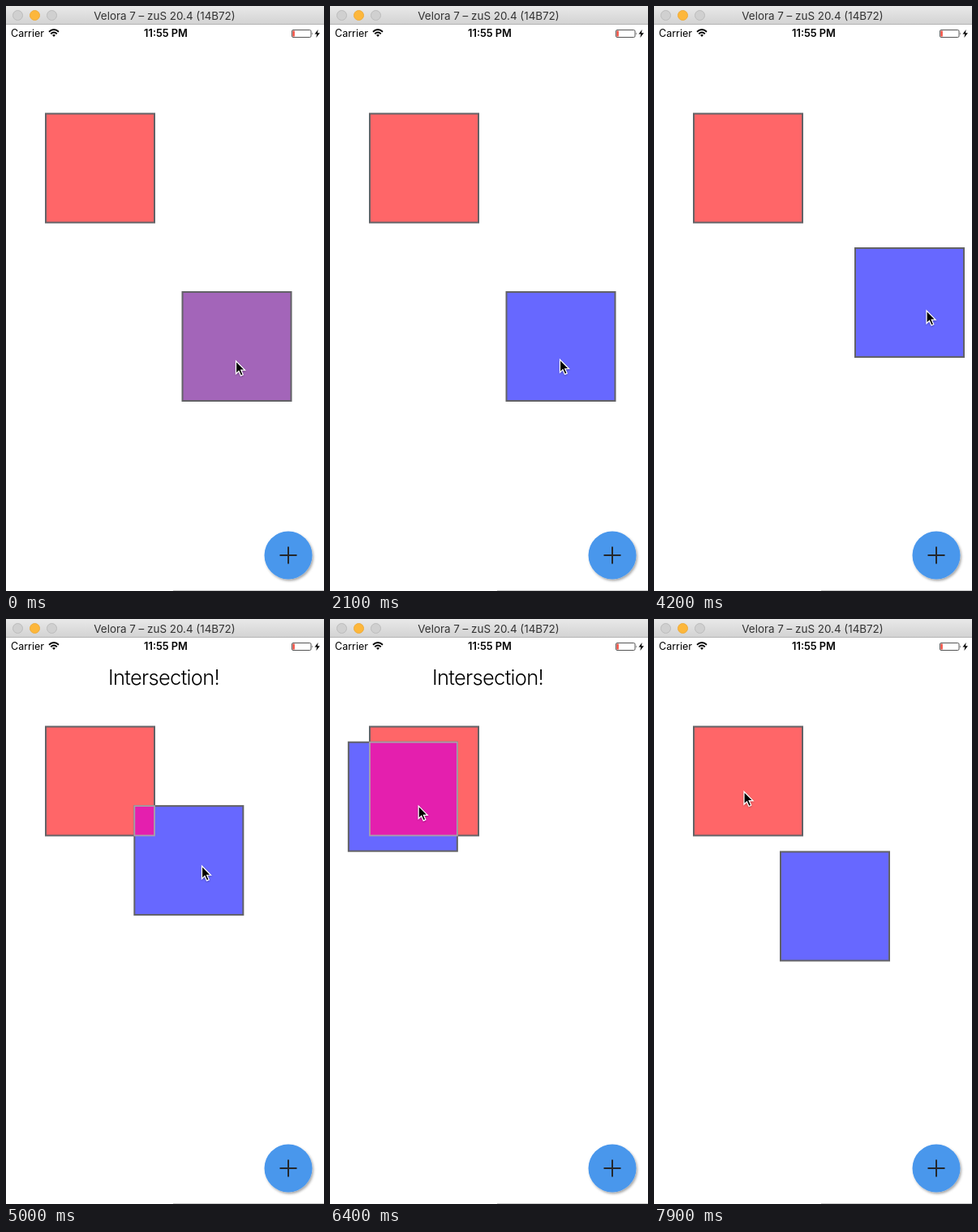
An HTML page for the animation above (8 s loop, 392 px wide and 720 px high).

```html
<!DOCTYPE html>
<html lang="en">
<head>
<meta charset="utf-8">
<style>
  html, body { margin: 0; width: 100%; height: 100%; overflow: hidden; background: #fff; }
  svg { display: block; width: 392px; height: 720px; font-family: Inter, Roboto, sans-serif; }
  .square { stroke: #626266; stroke-width: 2; }
</style>
</head>
<body>
<svg viewBox="0 0 392 720">
  <defs>
    <linearGradient id="bar" x2="0" y2="1">
      <stop stop-color="#e9e9e9"/><stop offset="1" stop-color="#d3d3d3"/>
    </linearGradient>
    <filter id="shadow" x="-20%" y="-20%" width="140%" height="140%">
      <feDropShadow dx="1.5" dy="2" stdDeviation="1.5" flood-opacity=".35"/>
    </filter>
    <filter id="soft" x="-30%" y="-30%" width="160%" height="160%">
      <feDropShadow dx="0" dy="1" stdDeviation=".8" flood-opacity=".3"/>
    </filter>
  </defs>

  <!-- window bar -->
  <rect width="392" height="22" fill="url(#bar)"/>
  <rect y="22" width="392" height="1" fill="#b4b4b4"/>
  <g fill="#d0d0d0" stroke="#bcbcbc">
    <circle cx="14.5" cy="11.5" r="6"/>
    <circle cx="35.5" cy="11.5" r="6" fill="#fdb73b" stroke="#eeac3c"/>
    <circle cx="56.5" cy="11.5" r="6"/>
  </g>
  <text x="195.5" y="16.5" font-size="13.4" text-anchor="middle" fill="#333">Velora 7 – zuS 20.4 (14B72)</text>

  <!-- status bar -->
  <text x="6" y="38" font-size="12.5">Carrier</text>
  <g fill="none" stroke="#000" stroke-width="1.9">
    <path d="M53 31.8Q59 26.4 65 31.8M55.2 34.2Q59 30.8 62.8 34.2"/>
    <path d="M57 35.8Q59 34.2 61 35.8L59 38Z" fill="#000" stroke="none"/>
  </g>
  <text x="197" y="38" font-size="12.8" font-weight="600" text-anchor="middle">11:55 PM</text>
  <rect x="352.5" y="29.5" width="23.5" height="9" rx="1.5" fill="#fff" stroke="#555"/>
  <rect x="353.5" y="30.5" width="2.2" height="7" fill="#f03a2c"/>
  <path d="M377 32.2q1.6 1.8 0 3.6z" fill="#555"/>
  <path d="M384.7 29l-4.2 5.6h2.8l-1 4.4 4.6-5.8h-3z"/>

  <text id="label" x="126" y="80.5" font-size="25.5" font-weight="300" letter-spacing="-.7">Intersection!</text>

  <rect class="square" x="49" y="132.5" width="134" height="134" fill="#ff6668"/>
  <rect class="square" id="box" width="134" height="134"/>
  <rect id="overlap" fill="#e41fae" stroke="#aaa0a8" stroke-width="1.8"/>

  <circle cx="348" cy="676" r="29.5" fill="#4a97ec" filter="url(#shadow)"/>
  <path d="M337.5 676h21M348 665.5v21" stroke="#25282c" stroke-width="2"/>
  <path d="M206 719.5H392" stroke="#c8c8c8"/>

  <path id="cursor" d="M0 0V15.5L3.5 12.2L6 18L8.7 16.8L6.2 11.2H11Z" stroke="#fff" stroke-width="1.2" filter="url(#soft)"/>
</svg>
<script>
const LOOP = 8000, STEP = 100, SIDE = 134;
const red = { x: 49, y: 132.5 };
const $ = id => document.getElementById(id);

// Turning points of the drag: time, box x and y, pointer offset from the box
const stops = [
  [0, 217.5, 352, 66, 85],
  [2300, 217.5, 352, 66, 83],
  [3200, 137.4, 226, 79, 71],
  [4200, 248, 298, 88, 77],
  [5600, 72, 172.5, 80, 72],
  [6350, 22, 152, 86, 78],
  [7100, 115.4, 149, 90, 85],
  [7500, 156, 286.5, 87, 83],
  [7900, 156, 286.5, -45, -74]
];

// Harmonic mean of the neighbouring slopes; flat where the direction turns
function slope(i, axis) {
  const p = stops[i - 1], k = stops[i], n = stops[i + 1];
  if (!p || !n) return 0;
  const a = (k[axis] - p[axis]) / (k[0] - p[0]);
  const b = (n[axis] - k[axis]) / (n[0] - k[0]);
  return a * b > 0 ? 2 * a * b / (a + b) : 0;
}

function pose(t) {
  const i = Math.max(0, stops.findLastIndex((s, n) => s[0] <= t && n < stops.length - 1));
  const a = stops[i], b = stops[i + 1], d = b[0] - a[0];
  const u = Math.min(1, (t - a[0]) / d), ease = u * u * (3 - 2 * u);
  return [1, 2, 3, 4].map(axis => a[axis] + (b[axis] - a[axis]) * ease
    + d * u * (1 - u) * ((1 - u) * slope(i, axis) - u * slope(i + 1, axis)));
}

function set(id, attrs) {
  for (const name in attrs) $(id).setAttribute(name, attrs[name]);
}

function draw(now) {
  const t = Math.floor(now % LOOP / STEP) * STEP;
  const [bx, by, dx, dy] = pose(t);
  const rest = Math.max(0, 1 - t / 300);
  set('box', {
    x: bx, y: by,
    fill: `rgb(${103 + 60 * rest},${104 - 3 * rest},${255 - 70 * rest})`
  });
  set('cursor', { transform: `translate(${bx + dx} ${by + dy})` });

  const x = Math.max(bx, red.x), y = Math.max(by, red.y);
  const width = Math.min(bx, red.x) + SIDE - x;
  const height = Math.min(by, red.y) + SIDE - y;
  const hit = width > 0 && height > 0;
  if (hit) set('overlap', { x, y, width, height });
  for (const id of ['overlap', 'label']) set(id, { visibility: hit ? 'visible' : 'hidden' });
}

const start = performance.now();
function frame() {
  draw(performance.now() - start);
  requestAnimationFrame(frame);
}
frame();
</script>
</body>
</html>
```
